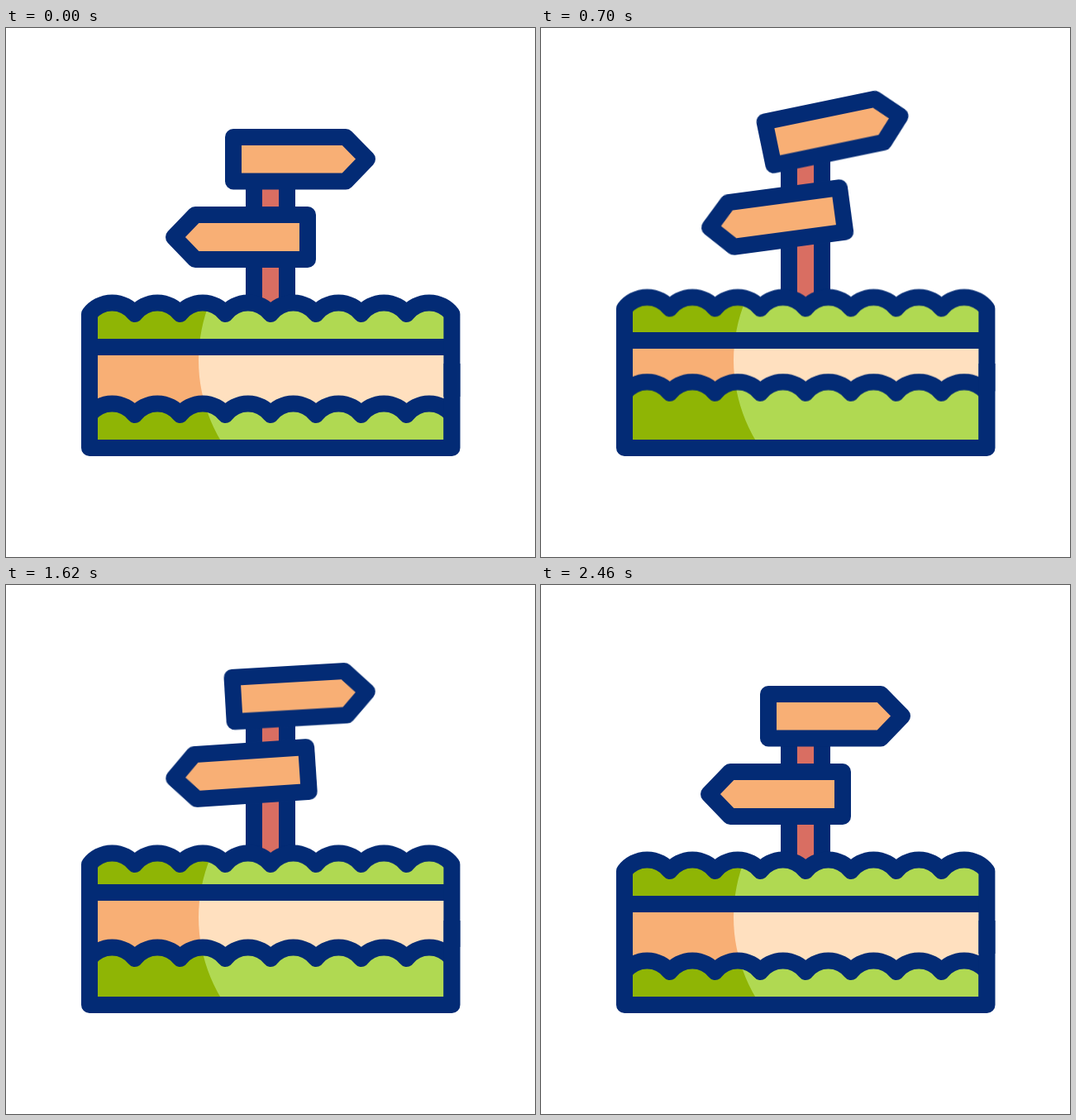
Recreate the animation shown at these times as an HTML page. Size 640x640 px, loop 2760 ms.

```html
<!DOCTYPE html>
<html lang="en">
<head>
<meta charset="utf-8">
<title>Signpost</title>
<style>
  html, body { margin: 0; width: 100%; height: 100%; overflow: hidden; background: #fff; }
  svg { display: block; width: 100vw; height: 100vh; }

  .line { fill: none; }
  .line, .post, .sign { stroke: #032b75; stroke-width: 20; stroke-linejoin: round; }
  .post { fill: #d96e62; }
  .sign { fill: #f8af75; }
  .dark { fill: #8fb505; }
  .dark .path { fill: #f8af75; }
  .light { fill: #b0d952; }
  .light .path { fill: #ffe0bf; }

  /* this curve is an exact smoothstep between extremes */
  .front, .path, .bush, .post, .sign {
    animation: 2760ms cubic-bezier(.33333, 0, .66667, 1) infinite;
  }
  .front { animation-name: front; }
  .path { animation-name: path; }
  .bush { animation-name: bush; }
  .post { animation-name: post; }
  .upper { animation-name: upper; transform-origin: 320px 158.5px; }
  .lower { animation-name: lower; transform-origin: 320px 253px; }

  @keyframes front {
    0%, 89.13%, 100% { transform: translateY(0); }
    9.42% { transform: translateY(23.3px); }
    26.09% { transform: translateY(-26.6px); }
    42.75% { transform: translateY(6.4px); }
    57.61% { transform: translateY(-16.3px); }
    74.64% { transform: translateY(6.7px); }
  }
  @keyframes path {
    0%, 89.13%, 100% { transform: translateY(0); }
    11.96% { transform: translateY(28.6px); }
    27.9% { transform: translateY(-10.7px); }
    43.12% { transform: translateY(16.6px); }
    58.33% { transform: translateY(-14px); }
    75.36% { transform: translateY(6.4px); }
  }
  @keyframes bush {
    0%, 89.13%, 100% { transform: translateY(0); }
    11.96% { transform: translateY(19.6px); }
    27.9% { transform: translateY(-8.5px); }
    43.12% { transform: translateY(11.3px); }
    58.33% { transform: translateY(-8.1px); }
    75.36% { transform: translateY(6.4px); }
  }
  @keyframes post {
    0%, 89.13%, 100% { transform: translateY(0); }
    11.96% { transform: translateY(19.6px); }
    27.9% { transform: translateY(-5px); }
    43.12% { transform: translateY(7.7px); }
    58.33% { transform: translateY(-7px); }
    75.36% { transform: translateY(3px); }
  }
  @keyframes upper {
    0%, 89.13%, 100% { transform: translateY(0) rotate(0deg); }
    15.58% { transform: translateY(36.5px) rotate(8.4deg); }
    27.9% { transform: translateY(-36px) rotate(-14.1deg); }
    44.75% { transform: translateY(14.5px) rotate(4.05deg); }
    59.78% { transform: translateY(-23.3px) rotate(-3.4deg); }
    75.36% { transform: translateY(-1.5px) rotate(2.25deg); }
  }
  @keyframes lower {
    0%, 89.13%, 100% { transform: translateY(0) rotate(0deg); }
    14.67% { transform: translateY(30.5px) rotate(9.4deg); }
    28.99% { transform: translateY(-37.8px) rotate(-10.8deg); }
    44.02% { transform: translateY(9.5px) rotate(3.8deg); }
    59.06% { transform: translateY(-27px) rotate(-3.8deg); }
    74.28% { transform: translateY(0) rotate(1.95deg); }
  }
</style>
</head>
<body>
<svg viewBox="0 0 640 640">
  <defs>
    <path id="hedge" d="M101 446V346a34.5 34.5 0 0 1 54.8 0 34.5 34.5 0 0 1 54.8 0 34.5 34.5 0 0 1 54.8 0 34.5 34.5 0 0 1 54.8 0 34.5 34.5 0 0 1 54.8 0 34.5 34.5 0 0 1 54.8 0 34.5 34.5 0 0 1 54.8 0 34.5 34.5 0 0 1 54.8 0V446"/>
    <clipPath id="box"><path d="M101 300H539.5V508H101z"/></clipPath>
    <clipPath id="sunny"><path d="M540 220V600H423V592A190 190 0 0 1 423 212H540z"/></clipPath>
  </defs>

  <path class="post" d="M300 400V152a20 20 0 0 1 40 0V400z"/>
  <path class="sign lower" d="M365 226H229l-26 27 26 27h136z"/>
  <path class="sign upper" d="M275 132h136l26 26.5-26 27H275z"/>

  <g clip-path="url(#box)">
    <g class="dark">
      <use class="bush" href="#hedge"/>
      <path class="path" d="M101 386H540V580H101z"/>
      <g class="front"><use href="#hedge" y="122"/></g>
    </g>
    <g class="light" clip-path="url(#sunny)">
      <use class="bush" href="#hedge"/>
      <path class="path" d="M101 386H540V580H101z"/>
      <g class="front"><use href="#hedge" y="122"/></g>
    </g>
    <path class="line path" d="M101 386H539.5" style="fill:none"/>
    <g class="front"><use class="line" href="#hedge" y="122"/></g>
  </g>
  <use class="line bush" href="#hedge"/>
  <path class="line" d="M101 406V508H539.5V406"/>
</svg>
</body>
</html>
```
